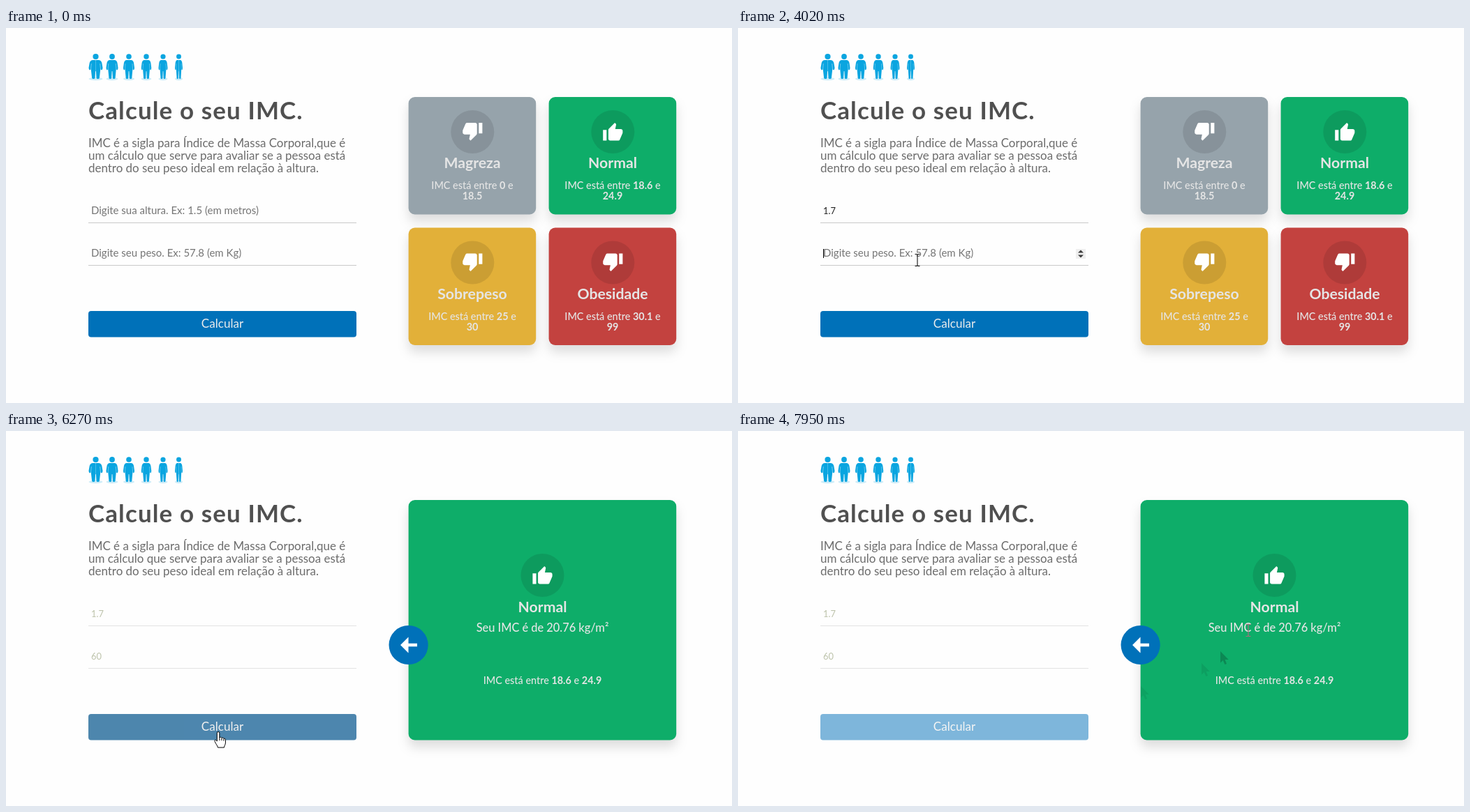
Recreate the animation shown at these times as an HTML page. Size 1040 by 538 pixels, loop 7990 ms.

```html
<!DOCTYPE html>
<html lang="pt-BR">
<head>
<meta charset="utf-8">
<title>Calcule o seu IMC</title>
<style>
  html, body { margin: 0; width: 100%; height: 100%; overflow: hidden; background: #fefefe; }
  svg { display: block; width: 1040px; height: 538px; font-family: Lato, "Open Sans", sans-serif; }
  .shadow { filter: drop-shadow(0 10px 8px rgba(0, 0, 0, .13)); }
  .card text { fill: #e5e5e5; text-anchor: middle; font-weight: 500; }
  .card .name { font-size: 21.2px; font-weight: 700; }
  .range { font-size: 14.4px; }
  .range tspan { font-weight: 700; }
  .title { font-size: 35px; font-weight: 700; letter-spacing: 1.1px; fill: #505050; }
  .hint { font-size: 15px; fill: #757575; }
  .value { font-size: 12.9px; fill: #222; }
  .done .value { fill: #bdc3ab; }
  .done .rule { stroke: #e3e3e3; }
  .rule { stroke: #c9c9c9; }
</style>
</head>
<body>
<svg id="stage" viewBox="0 0 1040 538">
  <defs>
    <path id="thumb" d="M1 21h4V9H1v12zm22-11c0-1.1-.9-2-2-2h-6.31l.95-4.57.03-.32c0-.41-.17-.79-.44-1.06L14.17 1 7.59 7.59C7.22 7.95 7 8.45 7 9v10c0 1.1.9 2 2 2h9c.83 0 1.54-.5 1.84-1.22l3.02-7.05c.09-.23.14-.47.14-.73v-2z"/>
    <path id="pointer" d="M0 0V16.5L3.8 13 6.4 19 9 17.9 6.5 12H11.7Z"/>
    <g id="spin">
      <rect x="484" y="-7" width="14" height="14" fill="#efefef"/>
      <path d="M487 -1.5 491 -5.5 495 -1.5ZM487 1.5 491 5.5 495 1.5Z" fill="#3c3c3c"/>
    </g>
  </defs>

  <g id="people" fill="#0aa5e0"></g>
  <text class="title" x="118" y="130.5">Calcule o seu IMC.</text>
  <g font-size="16.95" fill="#6c6c6c">
    <text x="118" y="170.5">IMC é a sigla para Índice de Massa Corporal,que é</text>
    <text x="118" y="188.5">um cálculo que serve para avaliar se a pessoa está</text>
    <text x="118" y="206.5">dentro do seu peso ideal em relação à altura.</text>
  </g>

  <g id="form">
    <path class="rule" d="M118 279.5H502M118 340.5H502"/>
    <text id="hint0" class="hint" x="122" y="267">Digite sua altura. Ex: 1.5 (em metros)</text>
    <text id="hint1" class="hint" x="122" y="328">Digite seu peso. Ex: 57.8 (em Kg)</text>
    <text id="value0" class="value" x="122" y="267"></text>
    <text id="value1" class="value" x="122" y="328"></text>
    <use id="spin0" href="#spin" y="263"/>
    <use id="spin1" href="#spin" y="324"/>
    <rect id="caret" width="1" height="13"/>
  </g>
  <g id="button">
    <rect id="face" x="118" y="406" width="384" height="37.5" rx="4"/>
    <text x="310" y="430" font-size="17.1" fill="#ececec" text-anchor="middle">Calcular</text>
  </g>

  <g id="levels"></g>
  <g id="result" class="card">
    <rect class="shadow" x="576.6" y="99" width="383.6" height="344.5" rx="9" fill="#0ead69"/>
    <g id="badge"></g>
    <text class="name" x="768.5" y="259.5">Normal</text>
    <text x="768.5" y="287.5" font-size="16.4">Seu IMC é de 20.76 kg/m²</text>
    <text class="range" x="768.5" y="363">IMC está entre <tspan>18.6</tspan> e <tspan>24.9</tspan></text>
    <circle cx="576.6" cy="307" r="28.1" fill="#0071b9"/>
    <path d="M565 307 576.5 295.5V304.7H589V309.3H576.5V318.5Z" fill="#fff"/>
  </g>

  <g id="trail" fill="#0b4f35"></g>
  <g id="cursor">
    <use id="arrow" href="#pointer" fill="#fff" stroke="#000"/>
    <path id="beam" d="M-3.5 -8.5H-1L0 -7.8 1 -8.5H3.5M0 -8V8M-3.5 8.5H-1L0 7.8 1 8.5H3.5" fill="none" stroke-width="1.1"/>
    <g id="hand" fill="#fff" stroke="#000" stroke-linejoin="round" transform="translate(-.8 -.8)">
      <path d="M-1.5 13V1.2A1.7 1.7 0 0 1 2 1.2V8C2.8 6.9 4.6 7 5.1 8.4 6.2 7.6 7.7 8 8.1 9.3 9.4 8.7 10.6 9.5 10.6 11V15C10.6 18 9 19 8.6 22H-.4C-.8 19.4-3 17.5-4.6 13.6-5.8 11.2-3.6 9.8-1.5 13Z"/>
      <path d="M2 8V12M5.1 8.8V12M8.1 9.6V12.5" fill="none"/>
    </g>
  </g>
</svg>
<script>
const LOOP = 7990, DONE = 6150;
const $ = id => document.getElementById(id);
const clamp = v => Math.max(0, Math.min(1, v));
const show = (el, on) => { el.style.display = on ? "" : "none"; };

// Figures: centre and full width, heaviest first.
const half = "M0 46H.2Q.38 46.2 .44 50L.5 57Q.5 60 .43 60.5L.34 59 .27 71.5Q.26 73 .16 73 .06 73 .05 71.5L.02 62H0Z";
$("people").innerHTML = [[128.5, 20], [152, 17], [176, 16], [201, 14.5], [225, 13], [247.5, 11]].map(([x, w]) => `
  <ellipse cx="${x}" cy="73" rx="${w / 2}" ry="2.2" opacity=".2"/>
  <circle cx="${x}" cy="41" r="${2.7 + w * .07}"/>` +
  [w, -w].map(s => `<g transform="translate(${x} 0) scale(${s} 1)">
    <path d="${half}"/><path d="M.31 51 .35 59" stroke="#fefefe" stroke-width=".04"/></g>`).join("")
).join("");

const badge = (x, y, up) => `<circle cx="${x}" cy="${y}" r="31" fill="#000" fill-opacity=".1"/>
  <use href="#thumb" fill="#fff" transform="translate(${x} ${y - .2}) rotate(${up ? 0 : 180}) scale(1.28) translate(-12 -11)"/>`;

const card = (x, y, color, name, from, to, up) => `<g class="card">
  <rect class="shadow" x="${x - .4}" y="${y}" width="182.6" height="168.5" rx="9" fill="${color}"/>
  ${badge(x + 91.3, y + 50, up)}
  <text class="name" x="${x + 91}" y="${y + 102}">${name}</text>
  <text class="range" x="${x + 91}" y="${y + 132}">IMC está entre <tspan>${from}</tspan> e</text>
  <text class="range" x="${x + 91}" y="${y + 147}"><tspan>${to}</tspan></text></g>`;

$("levels").innerHTML =
  card(577, 99, "#96a3ab", "Magreza", "0", "18.5") +
  card(778, 99, "#0ead69", "Normal", "18.6", "24.9", true) +
  card(577, 286.5, "#e2b039", "Sobrepeso", "25", "30") +
  card(778, 286.5, "#c3423f", "Obesidade", "30.1", "99");
$("badge").innerHTML = badge(768.5, 207, true);

// Faint marks the pointer leaves on the result card.
const marks = [[577, 366, .12, 6630], [664, 333, .15, 6710], [691, 316, .4, 6800]];
$("trail").innerHTML = marks.map(([x, y, o]) =>
  `<use href="#pointer" x="${x}" y="${y}" opacity="${o}"/>`).join("");

// Pointer path: time, x, y, shape from there on.
const path = [
  [250, 790, 532, "arrow"], [520, 600, 461, "arrow"], [620, 495, 420, "hand"],
  [690, 455, 404, "arrow"], [805, 300, 340, "beam"], [860, 272, 305, "arrow"],
  [890, 258, 279, "beam"], [920, 252, 268, "beam"], [1050, 252, 268, "beam"],
  [1170, 251, 267, "beam"], [3130, 251, 267, "beam"], [3200, 250, 280, "arrow"],
  [3290, 249, 303, "beam"], [3370, 248, 312, "beam"], [3560, 251, 341, "arrow"],
  [3650, 256, 339, "beam"], [3770, 257, 335, "beam"], [3920, 257, 334, "beam"],
  [4020, 257, 333, "beam"], [5380, 257, 333, "beam"], [5430, 260, 341, "arrow"],
  [5640, 285, 404, "hand"], [5800, 300, 436, "hand"], [5900, 303, 438, "hand"],
  [6150, 304, 433, "hand"], [6270, 304, 433, "hand"], [6510, 457, 401, "hand"],
  [6530, 470, 399, "arrow"], [6620, 577, 366, "arrow"], [6700, 664, 333, "arrow"],
  [6780, 691, 316, "arrow"], [6960, 759, 212, "arrow"], [7160, 759, 212, "arrow"],
  [7400, 680, 250, "arrow"], [7560, 638, 289, "arrow"], [7720, 690, 291, "beam"],
  [7950, 731, 286, "beam"]
];

// Typing: time, height, weight, focused field, caret.
const keys = [
  [0, "", "", -1, 0], [1110, "", "", 0, 1], [1600, "", "", 0, 0],
  [1860, "1", "", 0, 1], [2360, "1.", "", 0, 1], [2890, "1.", "", 0, 0],
  [2970, "1.7", "", 0, 1], [3470, "1.7", "", 0, 0], [3920, "1.7", "", 1, 1],
  [4450, "1.7", "", 1, 0], [4990, "1.7", "6", 1, 1], [5380, "1.7", "60", 1, 1],
  [5880, "1.7", "60", 1, 0], [DONE, "1.7", "60", -1, 0]
];

const hovers = [[620, 690], [5640, 6520]];
const FADE = 300;
const base = [0, 113, 185], dark = [18, 94, 147];
const hoverAt = t => Math.max(...hovers.map(([a, b]) =>
  Math.min(clamp((t - a) / FADE), clamp((b + Math.min(FADE, b - a) - t) / FADE))));

const lastBefore = (rows, t) => rows.findLastIndex(r => r[0] <= t);

function pointerAt(t) {
  const i = lastBefore(path, t);
  if (i < 0) return null;
  const a = path[i], b = path[i + 1] || a;
  const p = b === a ? 0 : (t - a[0]) / (b[0] - a[0]);
  return { x: a[1] + (b[1] - a[1]) * p, y: a[2] + (b[2] - a[2]) * p, shape: a[3] };
}

function draw(t) {
  const done = t >= DONE, pt = pointerAt(t);
  const [, height, weight, focus, caret] = keys[lastBefore(keys, t)];
  [height, weight].forEach((text, i) => {
    const top = 245 + 61 * i;
    const over = pt && pt.shape === "beam" && pt.x < 502 && pt.y >= top - 4 && pt.y <= top + 35;
    $("value" + i).textContent = text;
    show($("hint" + i), !text);
    show($("spin" + i), !done && (focus === i || over));
  });
  show($("caret"), caret);
  if (caret) {
    const field = $("value" + focus);
    const w = field.textContent ? field.getComputedTextLength() : 0;
    $("caret").setAttribute("x", Math.round(122 + w));
    $("caret").setAttribute("y", 256 + 61 * focus);
  }
  $("form").classList.toggle("done", done);

  const h = hoverAt(t), fade = 1 - clamp((t - DONE) / 400);
  $("face").setAttribute("fill", `rgb(${base.map((c, i) => Math.round(c + (dark[i] - c) * h))})`);
  $("button").setAttribute("opacity", done ? .5 + .5 * fade * fade : 1);
  show($("levels"), !done);
  show($("result"), done);
  marks.forEach((m, i) => show($("trail").children[i], t >= m[3]));

  show($("cursor"), pt);
  if (!pt) return;
  $("cursor").setAttribute("transform", `translate(${pt.x} ${pt.y})`);
  for (const id of ["arrow", "beam", "hand"]) show($(id), id === pt.shape);
  $("beam").setAttribute("stroke", done ? "#b5687f" : "#111");
}

const start = performance.now();
function tick() {
  draw((performance.now() - start) % LOOP);
  requestAnimationFrame(tick);
}
tick();
</script>
</body>
</html>
```
